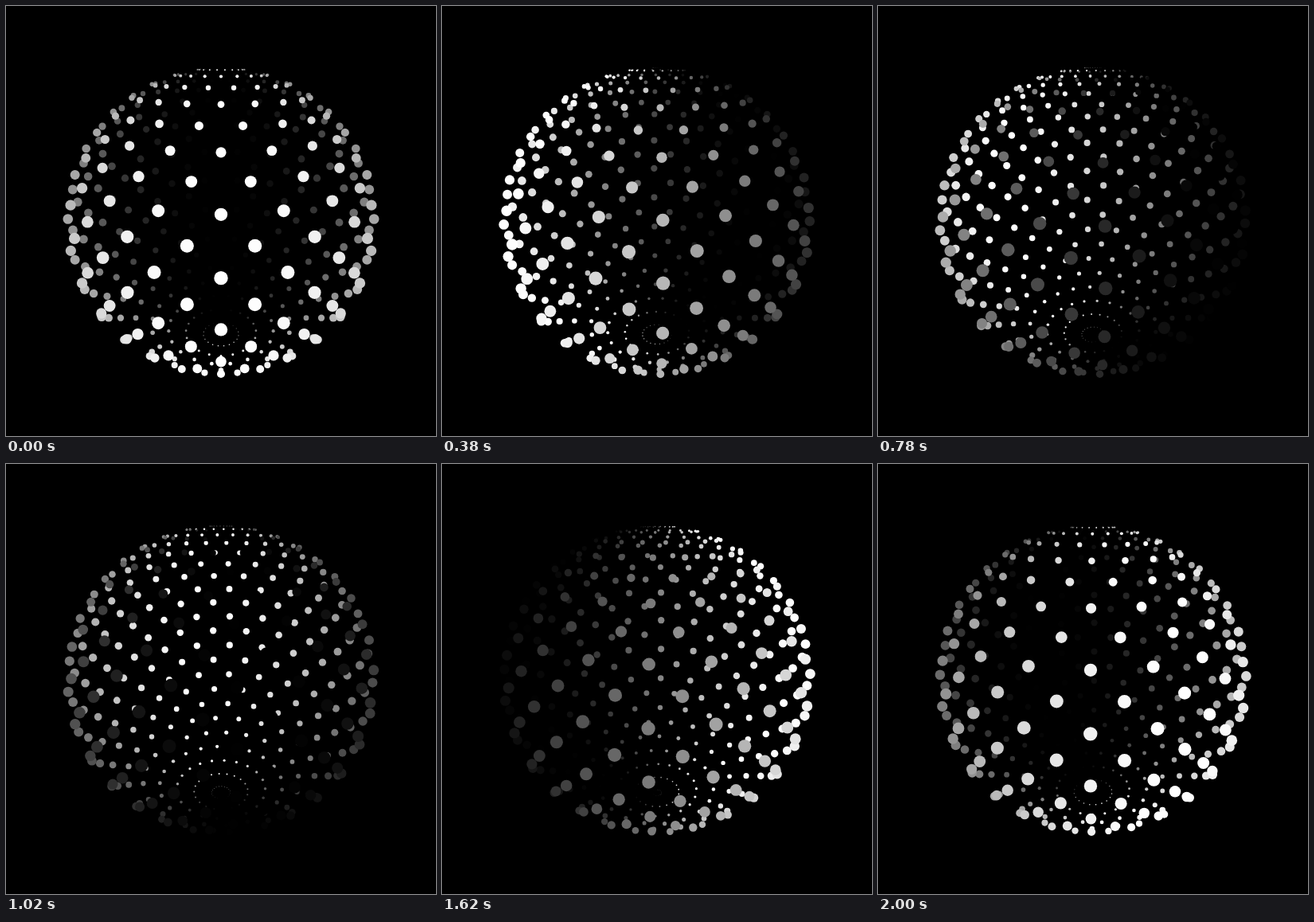
Write an HTML page that moves like this. It is 540 px wide and 540 px high and loops after 2.02 s.

```html
<!DOCTYPE html>
<html lang="en">
<head>
<meta charset="utf-8">
<title>Dotted sphere</title>
<style>
  html, body { margin: 0; width: 100%; height: 100%; overflow: hidden; background: #000; }
  svg { display: block; width: 100vw; height: 100vh; }
</style>
</head>
<body>
<svg id="stage" viewBox="0 0 540 540"></svg>
<script>
const TAU = Math.PI * 2;
const FRAME_MS = 20, LOOP_FRAMES = 101, CYCLE_FRAMES = 108;
const CENTER = 270, RADIUS = 178, CAMERA = 467.65, DOT = 5.56, TILT = 0.4;
const COLUMNS = 20, ROWS = 22;
const LAT_STEP = Math.PI / ROWS, LON_STEP = TAU / COLUMNS;
const sinTilt = Math.sin(TILT), cosTilt = Math.cos(TILT);

const stage = document.getElementById('stage');
const circles = Array.from({ length: ROWS * COLUMNS }, () =>
  stage.appendChild(document.createElementNS('http://www.w3.org/2000/svg', 'circle')));

function project(lat, lon, light) {
  const ring = Math.cos(lat);
  const height = Math.sin(lat);
  const front = ring * Math.cos(lon);
  const depth = height * sinTilt + front * cosTilt;
  const scale = CAMERA / (CAMERA - RADIUS * depth);
  return {
    x: CENTER + RADIUS * scale * ring * Math.sin(lon),
    y: CENTER - RADIUS * scale * (height * cosTilt - front * sinTilt),
    r: Math.max(0, DOT * ring * scale),
    shade: Math.round(127.5 + 127.5 * Math.cos(lon - light)),
    depth
  };
}

function render(ms) {
  const progress = Math.floor(ms / FRAME_MS) % LOOP_FRAMES / CYCLE_FRAMES;
  const light = -TAU * progress;
  const dots = [];
  // Each dot slides one row down and half a column sideways per cycle.
  for (let row = 1 - ROWS / 2; row <= ROWS / 2; row++) {
    const stagger = row % 2 ? 0 : 0.5;
    for (let column = 0; column < COLUMNS; column++) {
      dots.push(project(
        (row - progress) * LAT_STEP,
        (column + stagger + progress / 2) * LON_STEP,
        light));
    }
  }
  dots.sort((a, b) => a.depth - b.depth);
  dots.forEach(({ x, y, r, shade }, i) => {
    const circle = circles[i];
    circle.setAttribute('cx', x.toFixed(2));
    circle.setAttribute('cy', y.toFixed(2));
    circle.setAttribute('r', r.toFixed(2));
    circle.setAttribute('fill', `rgb(${shade},${shade},${shade})`);
  });
}

const start = performance.now();
function tick() {
  render(performance.now() - start);
  requestAnimationFrame(tick);
}
tick();
</script>
</body>
</html>
```
